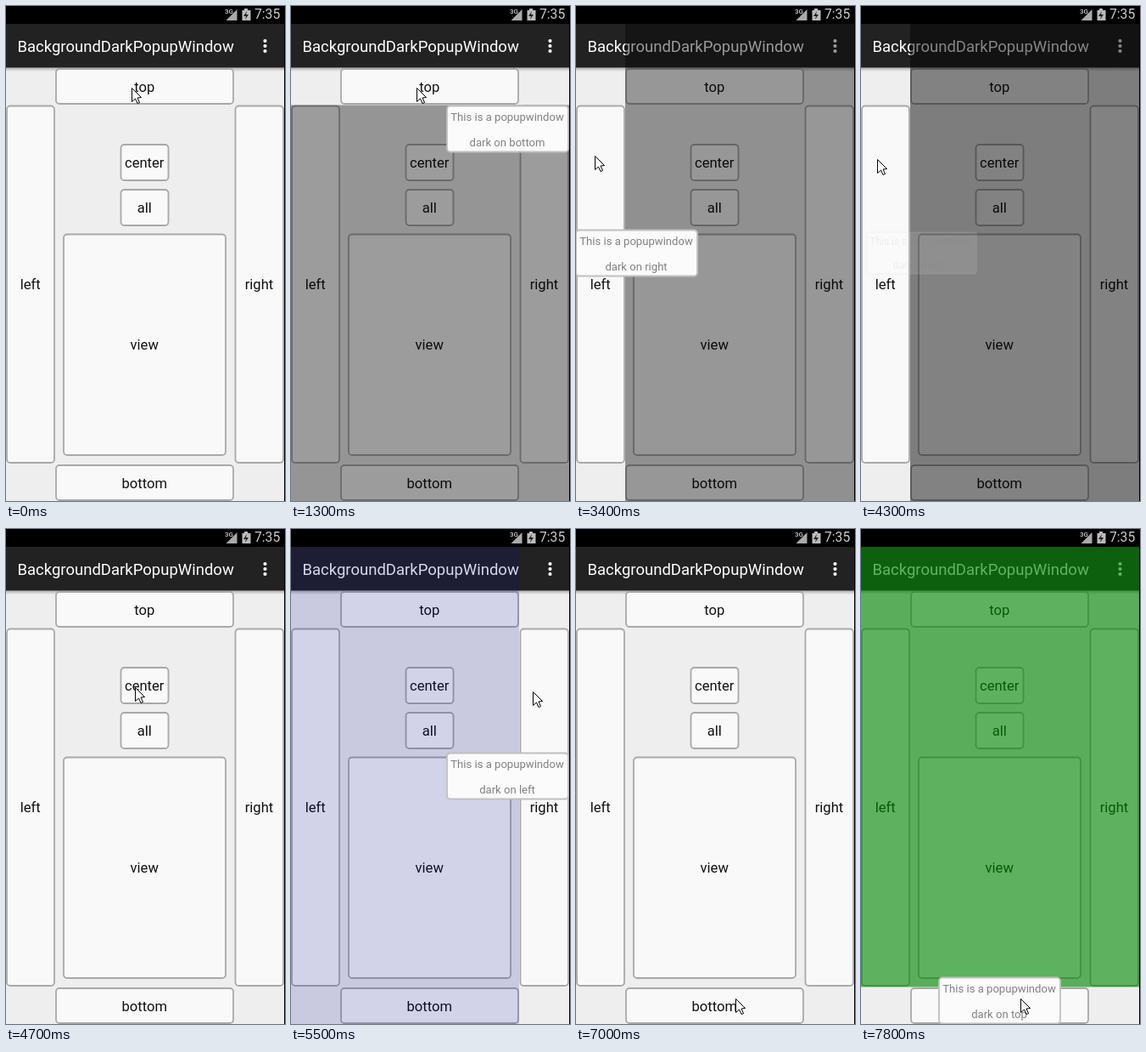
These frames come from a looping animation (329x582 px, 8000 ms). An HTML page with a canvas:

```html
<!DOCTYPE html>
<html lang="en">
<head>
<meta charset="utf-8">
<title>Popup windows with dimmed background</title>
<style>
  html, body { margin: 0; width: 100%; height: 100%; overflow: hidden; background: #000; }
  canvas { display: block; }
</style>
</head>
<body>
<canvas id="stage" width="329" height="582"></canvas>
<script>
const ctx = document.getElementById('stage').getContext('2d');
const LOOP = 8000, STEP = 100, FADE = 300;
const POPUP_W = 145, POPUP_H = 56;

// label, x, y, width, height, optional pressed interval
const buttons = [
  ['top', 58, 73, 211, 43, 900, 1200],
  ['left', 0, 116.5, 58, 421.5, 3000, 3300],
  ['right', 269.5, 116.5, 58.5, 421.5],
  ['center', 134.5, 162, 58, 44],
  ['all', 134.5, 215, 58, 44],
  ['view', 67, 267.5, 193, 261.5],
  ['bottom', 58, 539, 211, 43]
];

// area is the tinted rectangle, at is the popup's top left corner
const popups = [
  { open: 1100, close: 2030, rgb: '0,0,0', alpha: 0.5, area: [0, 116.5, 329, 466], at: [183, 116.5], side: 'bottom' },
  { open: 3190, close: 4260, rgb: '0,0,0', alpha: 0.5, area: [58, 21, 271, 561], at: [-1, 262.5], side: 'right' },
  { open: 5400, close: 6450, rgb: '0,0,139', alpha: 0.63, area: [0, 21, 269, 561], at: [183, 262.5], side: 'left' },
  { open: 7390, close: 9000, rgb: '0,135,0', alpha: 0.62, area: [0, 21, 329, 517.5], at: [91, 526.5], side: 'top' }
];

// time, x, y
const cursorPath = [
  [0, 148, 96], [1600, 148, 96], [1700, 157, 97], [1900, 119, 98], [2000, 119, 98],
  [2200, 112, 99], [2300, 112, 99], [2700, 22, 176], [3500, 22, 176], [3900, 19, 180],
  [4400, 19, 180], [5000, 285, 191], [6500, 285, 191], [7000, 188, 552], [LOOP, 188, 552]
];

const clamp = v => Math.min(1, Math.max(0, v));
const ease = v => (1 - Math.cos(Math.PI * clamp(v))) / 2;

function box(x, y, w, h, fill, stroke) {
  ctx.beginPath();
  ctx.roundRect(x + 1, y + 1, w - 2, h - 2, 4);
  ctx.fillStyle = fill;
  ctx.fill();
  ctx.strokeStyle = stroke;
  ctx.lineWidth = 1.8;
  ctx.stroke();
}

function text(label, x, y, size, color, align = 'center') {
  ctx.font = size + ' Roboto, sans-serif';
  ctx.fillStyle = color;
  ctx.textAlign = align;
  ctx.fillText(label, x, y);
}

function polygon(points, fill) {
  ctx.beginPath();
  points.forEach(([x, y]) => ctx.lineTo(x, y));
  ctx.closePath();
  ctx.fillStyle = fill;
  ctx.fill();
}

function drawBars() {
  ctx.fillStyle = '#000';
  ctx.fillRect(0, 0, 329, 21);
  text('3G', 258, 9, '500 8px', '#ccc', 'left');
  polygon([[272.5, 4], [272.5, 17], [259.5, 17]], '#aaa');
  ctx.fillStyle = '#bbb';
  ctx.fillRect(281, 3, 4, 2);
  ctx.fillRect(278.5, 5, 10, 12);
  polygon([[284, 6], [280, 12], [283, 12], [282, 16], [286, 10], [283, 10]], '#222');
  text('7:35', 293, 15, '15.7px', '#ccc', 'left');

  ctx.fillStyle = '#222';
  ctx.fillRect(0, 21, 329, 51.5);
  text('BackgroundDarkPopupWindow', 13.5, 54, '18.5px', '#fff', 'left');
  ctx.fillStyle = '#fff';
  for (const y of [41, 47, 53]) {
    ctx.beginPath();
    ctx.arc(305.5, y, 2.1, 0, 7);
    ctx.fill();
  }
  const shadow = ctx.createLinearGradient(0, 72, 0, 77);
  shadow.addColorStop(0, 'rgba(0,0,0,.3)');
  shadow.addColorStop(1, 'rgba(0,0,0,0)');
  ctx.fillStyle = shadow;
  ctx.fillRect(0, 72.5, 329, 5);
}

function drawButton([label, x, y, w, h, down, up], t) {
  box(x, y, w, h, t >= down && t < up ? '#ddd' : '#f9f9f9', '#a9a9a9');
  text(label, x + w / 2 - 0.3, Math.round(y + h / 2 + 6), '16.6px', '#111');
}

function drawTint({ open, close, rgb, alpha, area }, t) {
  const level = ease((t - open) / FADE) - ease((t - close) / FADE);
  ctx.fillStyle = `rgba(${rgb},${alpha * level})`;
  ctx.fillRect(...area);
}

function drawPopup({ open, close, at: [x, y], side }, t) {
  const shown = clamp((t - open) / 100) - clamp((t - close + 50) / 100);
  if (shown <= 0) return;
  const scale = 0.9 + 0.1 * shown;
  ctx.save();
  ctx.globalAlpha = shown;
  ctx.translate(x + POPUP_W / 2, y + POPUP_H / 2);
  ctx.scale(scale, scale);
  box(-POPUP_W / 2, -POPUP_H / 2, POPUP_W, POPUP_H, '#fbfbfb', '#c0c0c0');
  text('This is a popupwindow', -0.5, -10, '13.1px', '#808080');
  text('dark on ' + side, -0.5, 20, '13.1px', '#808080');
  ctx.restore();
}

function drawCursor(t) {
  const i = cursorPath.findIndex(p => p[0] > t);
  const [t0, x0, y0] = cursorPath[i - 1], [t1, x1, y1] = cursorPath[i];
  const k = (t - t0) / (t1 - t0);
  ctx.save();
  ctx.translate(Math.round(x0 + (x1 - x0) * k) + 0.5, Math.round(y0 + (y1 - y0) * k) + 0.5);
  polygon([[0, 0], [0, 16], [4, 12.5], [6.5, 18], [9, 17], [6.5, 11.5], [11, 11]], '#fff');
  ctx.strokeStyle = '#000';
  ctx.lineWidth = 1;
  ctx.stroke();
  ctx.restore();
}

function draw(now) {
  const t = Math.floor((now % LOOP) / STEP) * STEP;
  ctx.fillStyle = '#eee';
  ctx.fillRect(0, 0, 329, 582);
  drawBars();
  buttons.forEach(b => drawButton(b, t));
  popups.forEach(p => drawTint(p, t));
  popups.forEach(p => drawPopup(p, t));
  drawCursor(t);
  ctx.fillStyle = '#000';
  ctx.fillRect(328, 0, 1, 582);
}

const start = performance.now();
function frame() {
  draw(performance.now() - start);
  requestAnimationFrame(frame);
}
frame();
</script>
</body>
</html>
```
